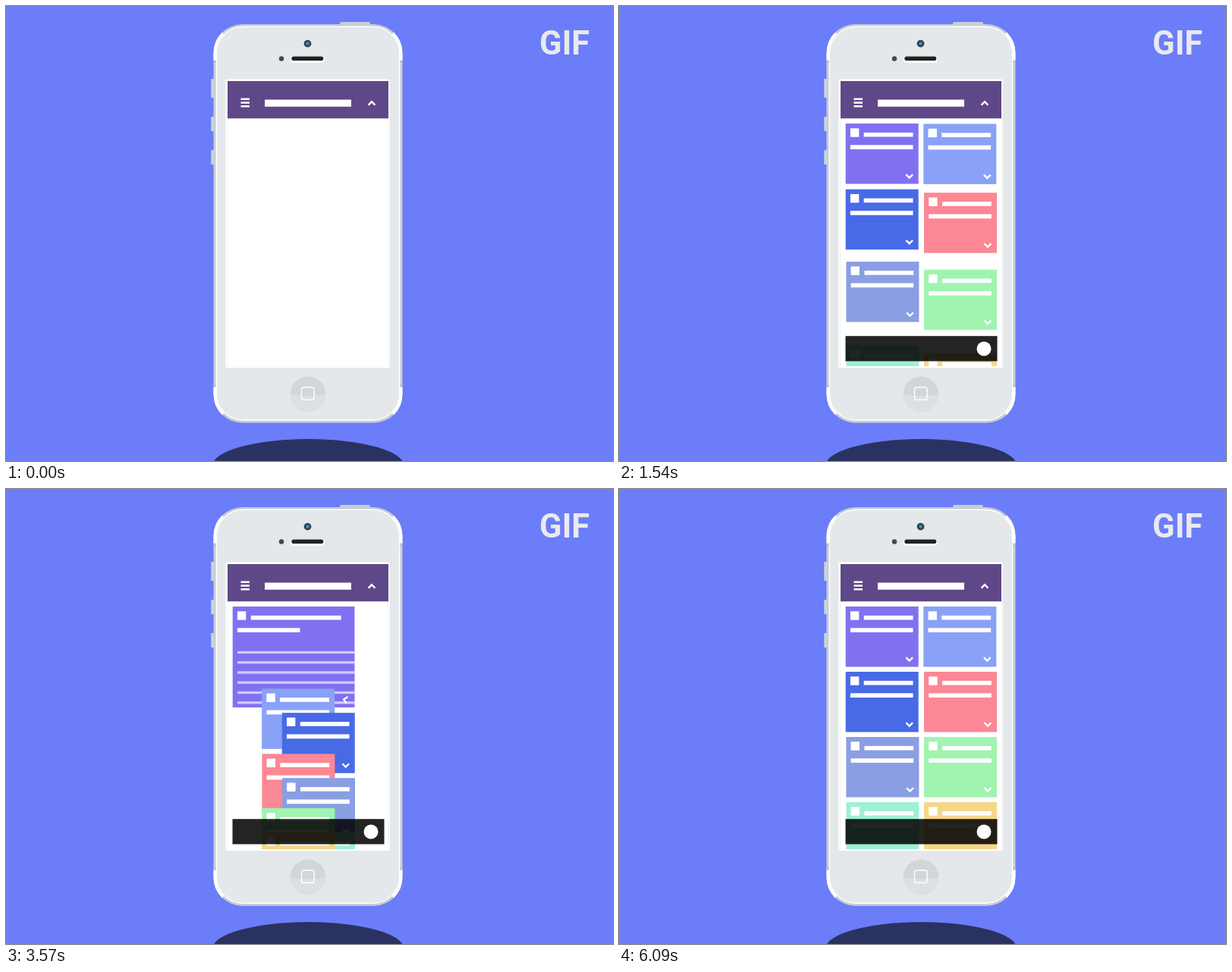
An HTML page that plays this animation: 800x600 px, repeating every 6300 ms.

```html
<!DOCTYPE html>
<html lang="en">
<head>
<meta charset="utf-8">
<title>Card list</title>
<style>
  html, body { margin: 0; width: 100%; height: 100%; overflow: hidden; background: #6b7df9; }
  svg { display: block; width: 100%; height: 100%; }
  text { font: 700 43.5px Roboto, sans-serif; fill: #e9eaee; }
  .chev { fill: none; stroke: #fff; stroke-width: 2.4; }
</style>
</head>
<body>
<svg viewBox="0 0 800 600">
  <defs>
    <clipPath id="screen"><rect x="292" y="148" width="212" height="327"/></clipPath>
    <clipPath id="open"><rect id="openBox" x="298.7" y="155"/></clipPath>
    <g id="corner">
      <path d="M275.2 72V62A36.7 36.7 0 0 1 286 36" fill="none" stroke="#fff" stroke-width="3.4"/>
      <path d="M273.5 71.5h3.4v3.5h-3.4z" fill="#b4bcc4"/>
    </g>
  </defs>
  <text x="703" y="64">GIF</text>
  <ellipse id="shadow" cx="398.3" cy="606" rx="126" ry="35" fill="#2a3261"/>
  <g id="phone">
    <path d="M270.3 96h5v25h-5zM270.3 146h5v19h-5zM270.3 190h5v19h-5z" fill="#cdd3d6"/>
    <rect x="440" y="21" width="40" height="8" rx="2" fill="#c8ced3"/>
    <rect x="273.5" y="24" width="249" height="525.7" rx="38" fill="#c6cdd3"/>
    <use href="#corner"/>
    <use href="#corner" transform="matrix(-1 0 0 1 796 0)"/>
    <use href="#corner" transform="matrix(1 0 0 -1 0 574)"/>
    <use href="#corner" transform="matrix(-1 0 0 -1 796 574)"/>
    <rect x="277.3" y="27.3" width="241.4" height="519" rx="35" fill="#e4e8eb" stroke="#fff" stroke-width="1.4"/>
    <circle cx="397.5" cy="49.6" r="4.9" fill="#37444f"/>
    <circle cx="397.5" cy="49.6" r="2" fill="#2fa0c4"/>
    <circle cx="363" cy="69.5" r="3.2" fill="#41484e"/>
    <rect x="374.5" y="66" width="45.5" height="9" rx="4.5" fill="#fff"/>
    <rect x="376.3" y="66.5" width="42" height="5.6" rx="2.8" fill="#222"/>
    <circle cx="398" cy="511.7" r="23.3" fill="#d2d6d8"/>
    <path d="M374.7 512.5Q398 516 421.3 512.5A23.3 23.3 0 0 1 374.7 512.5" fill="#dce0e2"/>
    <rect x="389.5" y="502.8" width="16.6" height="16.6" rx="3" fill="none" stroke="#fff" stroke-width="1.4"/>
    <rect x="289.3" y="96.6" width="216.6" height="380.4" rx="2.5" fill="#fff"/>
    <path d="M291.6 148V475M504.2 148V475" stroke="#eceef0" stroke-width=".8"/>
    <path d="M292 99h212v49.3h-212z" fill="#5f4888"/>
    <path d="M309.5 121.5h11.5v2.5h-11.5zM309.5 126.3h11.5v2.5h-11.5zM309.5 131h11.5v2.5h-11.5zM341 123.5h114v9.2h-114z" fill="#fff"/>
    <path class="chev" d="M477.6 130.6L482 126.2L486.4 130.6"/>
    <g clip-path="url(#screen)">
      <g id="cards"></g>
      <g id="bar">
        <rect x="298.5" y="435.2" width="200" height="33.2" fill="#000" fill-opacity=".86"/>
        <circle cx="481" cy="452" r="9.5" fill="#fff"/>
      </g>
      <circle id="touch" fill="#fff"/>
    </g>
  </g>
</svg>
<script>
const LOOP = 6300, STEP = 70;
const colors = ['#8171f0', '#89a2f8', '#486ae6', '#fc8795', '#8a9ee4', '#a0f4af', '#9ff0d7', '#f5d789'];
const delays = [0, 72, 90, 200, 257, 333, 400, 440];
const $ = id => document.getElementById(id);
const set = (id, attrs) => { for (const k in attrs) $(id).setAttribute(k, attrs[k]); };
const span = (t, start, dur) => Math.min(1, Math.max(0, (t - start) / dur));
const lerp = (a, b, k) => a + (b - a) * k;
const inOut = p => p < .5 ? 4 * p ** 3 : 1 - 4 * (1 - p) ** 3;
const sine = p => (1 - Math.cos(Math.PI * p)) / 2;

// Grid place of a card; places below the screen wait at its edge.
function slot(n) {
  const row = n >> 1;
  const x = n % 2 ? (row ? 402 : 401.3) : (row < 2 ? 298.7 : 299.4);
  return [x, Math.min(476, 155 + 86 * row)];
}

const rect = (x, y, w, h, fill = '#fff') =>
  `<rect x="${x}" y="${y}" width="${w}" height="${h}" fill="${fill}"/>`;

function card(i, x, y, w, h, line, turn, extra = '') {
  return `<g transform="translate(${x} ${y})">` +
    rect(0, 0, w, h, colors[i]) + rect(6.2, 6.3, 11.4, 11.4) +
    rect(24, 11.9, line, 5.6) + rect(6.2, 28.3, 82.6, 5.7) +
    `<path class="chev" d="M-4.4 -2.2L0 2.2L4.4 -2.2" transform="translate(${w - 12} ${h - 10.2}) rotate(${turn})"/>` +
    '</g>' + extra;
}

function bodyText(alpha) {
  let rows = '';
  for (let k = 0; k < 6; k++) rows += rect(305, 213.8 + 13.25 * k, k < 5 ? 176.7 : 156.5, 3.3);
  return `<g clip-path="url(#open)" opacity="${alpha}">${rows}</g>`;
}

function drawCards(t) {
  const grow = span(t, 2995, 1050);
  const openness = (ease, dur) => ease(grow) - ease(span(t, 5005, dur));
  let out = '';
  colors.forEach((_, i) => {
    const enter = 320 * (1 - span(t, 668 + delays[i], 900)) ** 3;
    const e = openness(inOut, i === 1 ? 908 : 1050);
    const [x, y] = slot(i);
    if (!i) {
      const w = lerp(96, 198.8, e), h = lerp(79.5, 164.5, e);
      set('openBox', { width: w, height: h });
      out += card(0, x, y + enter, w, h, lerp(64.8, 150.8, e),
        180 * openness(sine, 1050), e > 0 ? bodyText(e) : '');
    } else {
      const [tx, ty] = slot(i + 3);
      out += card(i, lerp(x, tx, e), lerp(y, ty, e) + enter, 96, 79.5, 64.8, 0);
    }
  });
  $('cards').innerHTML = out;
}

function drawTouch(t) {
  const first = t < 4000, start = first ? 2380 : 4410;
  const fade = span(t, start + 70, 490);
  set('touch', {
    cx: first ? 383.5 : 485.4, cy: first ? 224.2 : 307.6,
    r: 11.2 + 2.8 * fade, opacity: t < start ? 0 : 1 - fade
  });
}

function frame() {
  const t = Math.floor(performance.now() % LOOP / STEP) * STEP;
  const lift = Math.sin(Math.PI * span(t, 0, 1050)) ** 2;
  set('phone', { transform: `translate(0 ${-12 * lift})` });
  set('shadow', { rx: 126 - 10 * lift, ry: 35 - 3 * lift });
  set('bar', { transform: `translate(0 ${40 * (1 - inOut(span(t, 1030, 500)))})` });
  drawCards(t);
  drawTouch(t);
  requestAnimationFrame(frame);
}
frame();
</script>
</body>
</html>
```
